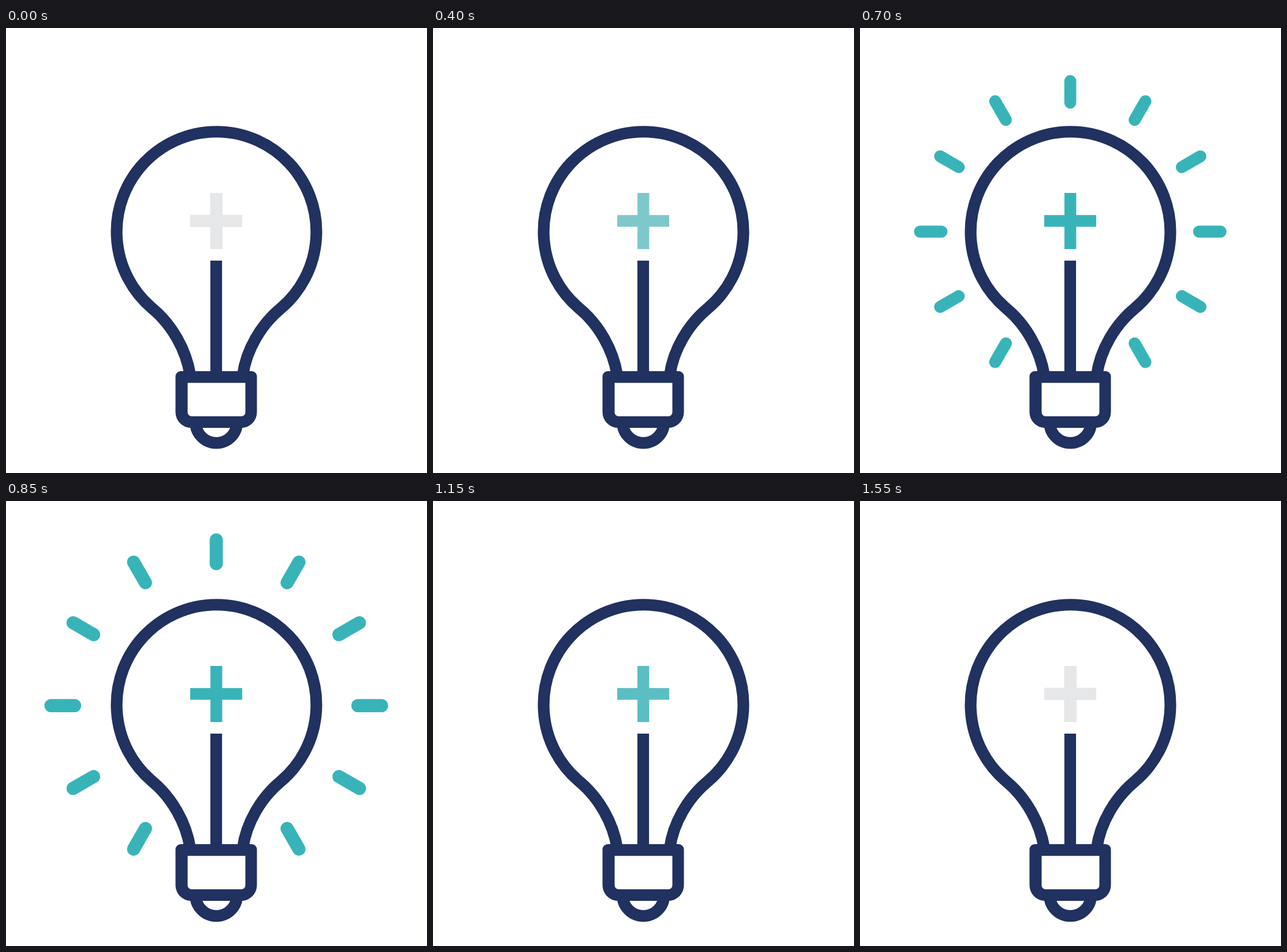
Animation, 729 px wide and 769 px high, one loop 1.75 s. Source, as an HTML page:

```html
<!DOCTYPE html>
<html lang="en">
<head>
<meta charset="utf-8">
<title>Light bulb</title>
<style>
  html, body { margin: 0; width: 100%; height: 100%; overflow: hidden; background: #fff; }
  svg { display: block; width: 100%; height: 100%; }
</style>
</head>
<body>
<svg viewBox="0 0 729 769">
  <path id="rays" fill="none" stroke="#38b4b9" stroke-width="20.7" stroke-linecap="round"/>
  <path id="plus" fill="none" d="M364.2 285V382M319 333.4H409"/>
  <g fill="#213160" stroke="#213160" stroke-width="20.2">
    <path d="M319 600C312 556 287.5 513 253.5 484.7A172.9 172.9 0 1 1 475.5 484.7C441.5 513 416 556 410 600" fill="none"/>
    <path d="M364 402V600"/>
    <circle cx="364.2" cy="681.3" r="35.9" fill="#fff"/>
    <g stroke="none">
      <path d="M302.5 593H425.5a9 9 0 0 1 9 9V664a27 27 0 0 1 -27 27H320.5a27 27 0 0 1 -27 -27V602a9 9 0 0 1 9 -9z"/>
      <path d="M314.5 613.3h100V664a7 7 0 0 1 -7 7H321.5a7 7 0 0 1 -7 -7z" fill="#fff"/>
    </g>
  </g>
</svg>
<script>
const LOOP = 1750;
const GRAY = [230, 231, 233], TEAL = [56, 180, 185];
const rays = document.getElementById('rays');
const plus = document.getElementById('plus');

// Eleven rays, 30 degrees apart, with a gap at the bottom
function rayPath() {
  let d = '';
  for (let deg = -150; deg <= 150; deg += 30) {
    const a = deg * Math.PI / 180;
    const at = r => `${Math.sin(a) * r} ${16.9 - Math.cos(a) * r}`;
    d += `M${at(223)}L${at(260.2)}`;
  }
  return d;
}
rays.setAttribute('d', rayPath());

// Whole steps of a given length passed since a start time
const count = (t, from, length) => Math.floor((t - from) / length);

function draw(t) {
  // The plus fades in and out in fifths, every 100 ms
  const level = Math.min(count(t, 100, 100), 5 - count(t, 1050, 100));
  const glow = Math.max(0, Math.min(5, level)) / 5;
  const rgb = GRAY.map((g, i) => Math.round(g + (TEAL[i] - g) * glow));
  plus.setAttribute('stroke', `rgb(${rgb})`);
  plus.setAttribute('stroke-width', glow ? 20.4 : 21.4);

  // The rays grow by a tenth every 150 ms, three sizes in all
  const size = count(t, 700, 150);
  rays.setAttribute('visibility', size >= 0 && size < 3 ? 'visible' : 'hidden');
  rays.setAttribute('transform', `translate(364.1 335) scale(${1 + size / 10})`);
}

const start = performance.now();
function tick() {
  draw((performance.now() - start) % LOOP);
  requestAnimationFrame(tick);
}
tick();
</script>
</body>
</html>
```
